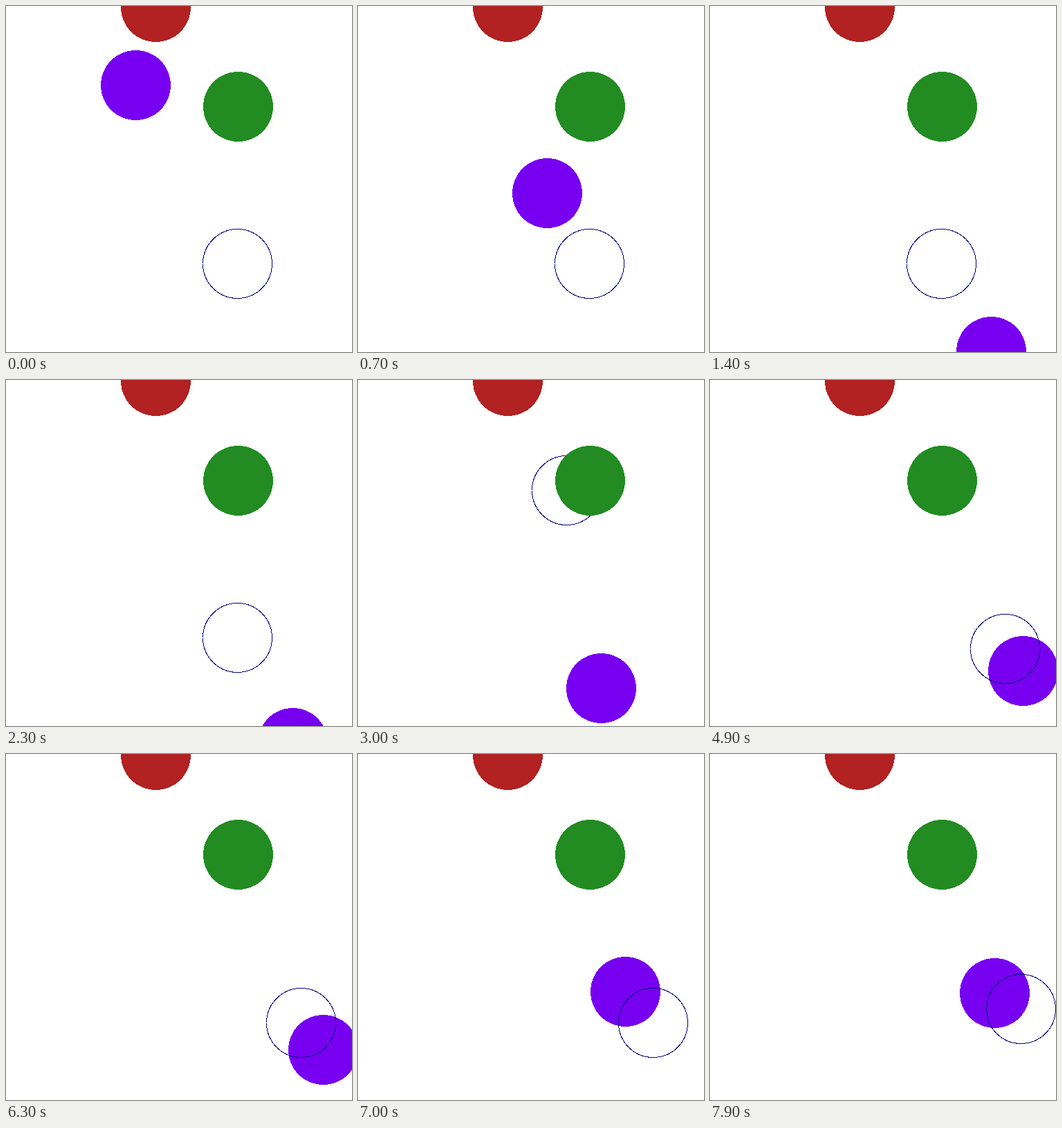
Animation, 500 px wide and 500 px high, one loop 8 s. Source, as an HTML page:

```html
<!DOCTYPE html>
<html>
<head>
<meta charset="utf-8">
<style>
  html, body { margin: 0; width: 100%; height: 100%; overflow: hidden; background: #fff; }
  svg { display: block; width: 100%; height: 100%; shape-rendering: crispEdges; }
</style>
</head>
<body>
<svg viewBox="0 0 500 500">
  <circle id="ball" r="50.5" fill="#7800f0"/>
  <circle id="ring" r="50" fill="none" stroke="#000080" stroke-dasharray="0 .5 156.08 1 156.08 .5"/>
  <circle cx="216.5" cy="1.5" r="50.5" fill="#b22222"/>
  <circle cx="335.5" cy="145.5" r="50.5" fill="#228b22"/>
</svg>
<script>
const STEP = 100, STEPS = 80;
const ball = document.getElementById('ball');
const ring = document.getElementById('ring');

// The ring jumps; the ball starts from rest and swings about it.
// Each path point is [step, x, y].
const swings = [
  { from: 0, ring: [334.5, 372.5], path: [
    [0, 187.5, 114.5], [3, 205.5, 147], [6, 253, 233], [9, 315.5, 348.5], [14, 406.5, 499.5],
    [18, 441.5, 556], [19, 442.5, 560], [23, 414, 524], [27, 368.5, 466.5], [30, 351.5, 445.5]] },
  { from: 30, ring: [301.5, 159.5], path: [
    [30, 351.5, 445.5], [33, 345, 410], [35, 335.5, 352], [37, 326, 275]] },
  { from: 37, ring: [426.5, 388.5], path: [
    [37, 326, 275], [40, 338.5, 288.5], [45, 397.5, 356.5], [49, 452.5, 420.5], [52, 484, 456],
    [56, 499, 472], [60, 483, 454], [63, 458.5, 427.5], [68, 401, 360], [72, 374.5, 329.5]] },
  { from: 73, ring: [449.5, 368.5], path: [
    [72, 374.5, 329.5], [76, 387, 335], [79, 411.5, 345.5]] }
];

// Cubic curve through the points, at rest at the first one.
function along(path, t, axis) {
  const last = path.length - 1;
  let i = 0;
  while (i < last - 1 && t >= path[i + 1][0]) i++;
  const slope = k => {
    if (k === 0) return 0;
    const a = path[k - 1], b = path[Math.min(k + 1, last)];
    return (b[axis] - a[axis]) / (b[0] - a[0]);
  };
  const a = path[i], b = path[i + 1], h = b[0] - a[0], u = (t - a[0]) / h, v = 1 - u;
  return a[axis] * v * v * (1 + 2 * u) + b[axis] * u * u * (3 - 2 * u)
    + h * u * v * (slope(i) * v - slope(i + 1) * u);
}

function place(circle, x, y) {
  circle.setAttribute('cx', x);
  circle.setAttribute('cy', y);
}

const snap = v => Math.floor(v) + .5;

function draw(now) {
  const t = Math.floor(now / STEP) % STEPS;
  const swing = swings.findLast(s => t >= s.from);
  place(ring, ...swing.ring);
  place(ball, snap(along(swing.path, t, 1)), snap(along(swing.path, t, 2)));
}

const start = performance.now();
function loop() {
  draw(performance.now() - start);
  requestAnimationFrame(loop);
}
loop();
</script>
</body>
</html>
```
